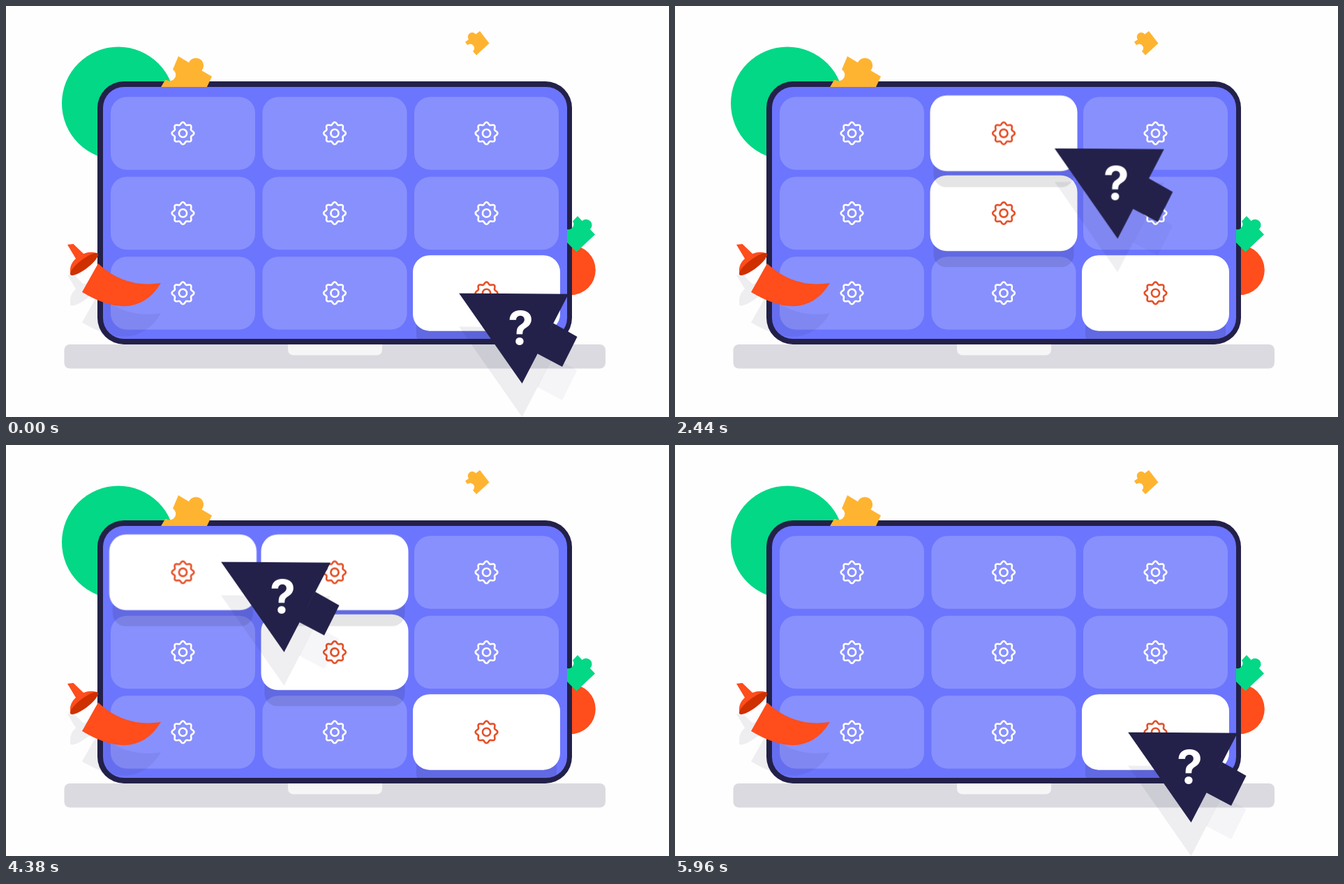
Write an HTML page that moves like this. It is 950x589 px and loops after 5980 ms.

```html
<!DOCTYPE html>
<html lang="en">
<head>
<meta charset="utf-8">
<title>Settings grid</title>
<style>
  html, body { margin: 0; width: 100%; height: 100%; overflow: hidden; background: #fefefe; }
  svg { display: block; width: 950px; height: 589px; }

  .navy { fill: #232149; }
  .yellow { fill: #ffb431; }
  .green { fill: #02d886; }
  .red { fill: #ff4d1c; --face: #cf3000; }
  .soft { fill: #232149; --face: #232149; opacity: .07; }
  .softer { fill: #232149; opacity: .04; }
  .face { fill: var(--face); }
  .gear { fill: none; stroke-width: 2.6; }

  .cursor, .center, .top, .corner {
    animation: 5980ms ease-in-out infinite;
  }
  .cursor { animation-name: travel; }
  .center { animation-name: center; }
  .top { animation-name: top; }
  .corner { animation-name: corner; }

  @keyframes travel {
    0%, 5.853% { transform: translate(649px, 411.5px); }
    14.214%, 30.853% { transform: translate(501.6px, 265.8px); }
    39.214%, 56.271% { transform: translate(543.7px, 203.9px); }
    64.632%, 81.054% { transform: translate(308px, 167.3px); }
    89.415%, 100% { transform: translate(649px, 411.5px); }
  }
  @keyframes center {
    0%, 5.853%, 89.415%, 100% { opacity: 0; transform: scale(.981, .97); }
    14.214%, 81.054% { opacity: 1; transform: none; }
  }
  @keyframes top {
    0%, 30.853%, 89.415%, 100% { opacity: 0; transform: scale(.981, .97); }
    39.214%, 81.054% { opacity: 1; transform: none; }
  }
  @keyframes corner {
    0%, 56.271%, 89.415%, 100% { opacity: 0; transform: scale(.981, .97); }
    64.632%, 81.054% { opacity: 1; transform: none; }
  }
  .mark { font: 700 66px Inter, "Liberation Sans", sans-serif; fill: #fff; text-anchor: middle; }
</style>
</head>
<body>
<svg viewBox="0 0 950 589">
  <defs>
    <clipPath id="screen"><rect x="139" y="116" width="665" height="361" rx="30"/></clipPath>
    <g id="gear"><path id="rim"/><circle r="5.6"/></g>
    <g id="horn">
      <path d="M88 342 L96.5 341 L111 355 Q122 351 131.5 354.5 L93 385.5 Q89 372 100 362Z"/>
      <ellipse class="face" cx="112" cy="370" rx="24.8" ry="6.8" transform="rotate(-37.5 112 370)"/>
      <path d="M132 369 Q170 405 222 397 Q186 456 109 410Z"/>
    </g>
    <path id="head" d="M0 0 L157 1.3 L90.5 129.5Z"/>
    <path id="stem" d="M135 43 L169.5 62.5 L148 105.5 L112 86.5Z"/>
  </defs>

  <circle class="green" cx="161" cy="139.5" r="81"/>
  <circle class="red" cx="809" cy="378.5" r="35.8"/>
  <rect x="83.5" y="485" width="775.5" height="34.5" rx="8" fill="#dadae0"/>
  <path d="M404 485 H539 V492 Q539 500.5 530.5 500.5 H412.5 Q404 500.5 404 492Z" fill="#f6f6f7"/>
  <rect class="navy" x="131" y="108" width="680" height="377" rx="38"/>

  <path class="yellow" d="M247 72 L262 81 A11 11 0 1 1 280.5 92.5 L295 101 L287 118 H221 L228 106 H230 A8.5 8.5 0 0 0 239 91Z"/>
  <path class="yellow" d="M679 36 L692.5 53.5 L674 70.5 L669 65 A5.8 5.8 0 0 0 661 56 L658 51.5 L663 48 A5.8 5.8 0 1 1 673 40.5Z"/>
  <rect x="139" y="116" width="665" height="361" rx="30" fill="#6c75fd"/>
  <path class="green" d="M819 301 L825.5 308 A7.5 7.5 0 1 1 837 320 L844 327.5 L817.5 352.5 L804 339 V320 A7.5 7.5 0 0 0 812 308.5Z"/>

  <g id="tiles" clip-path="url(#screen)"></g>

  <use href="#horn" class="soft" y="43.5"/>
  <use href="#horn" class="red"/>

  <g class="cursor">
    <g transform="translate(0 48)">
      <use href="#head" class="soft"/>
      <use href="#stem" class="softer"/>
    </g>
    <g class="navy"><use href="#head"/><use href="#stem"/></g>
    <text class="mark" x="88.5" y="73.5">?</text>
  </g>
</svg>
<script>
  const rim = Array.from({ length: 120 }, (_, i) => {
    const a = i / 60 * Math.PI;
    const r = 14.2 + 1.6 * Math.cos(8 * a);
    return (r * Math.cos(a)).toFixed(2) + ' ' + (r * Math.sin(a)).toFixed(2);
  });
  document.getElementById('rim').setAttribute('d', 'M' + rim.join('L') + 'Z');

  const litClass = { 0: 'corner', 1: 'top', 4: 'center', 8: 'lit' };

  const box = (w, h, dy, fill, r) =>
    `<rect x="${-w / 2}" y="${dy - h / 2}" width="${w}" height="${h}" rx="${r}" fill="${fill}"/>`;
  const gear = color => `<use href="#gear" class="gear" stroke="${color}"/>`;
  const at = (i, body) =>
    `<g transform="translate(${253.5 + 217.5 * (i % 3)} ${182.4 + 114.5 * Math.floor(i / 3)})">${body}</g>`;

  const plain = i => at(i, box(207, 104.5, 0, '#8890fd', 23) + gear('#fff'));
  const lit = i => at(i, `<g class="${litClass[i]}">` +
    box(201, 98.5, 28, 'rgba(0,0,0,.1)', 18) +
    box(211, 108.5, 0, '#fff', 24) + gear('#e64f27') + '</g>');

  // Lower rows go first so that each shadow falls on the row below.
  const cells = [...Array(9).keys()];
  document.getElementById('tiles').innerHTML =
    cells.map(plain).join('') + [8, 4, 1, 0].map(lit).join('');
</script>
</body>
</html>
```
